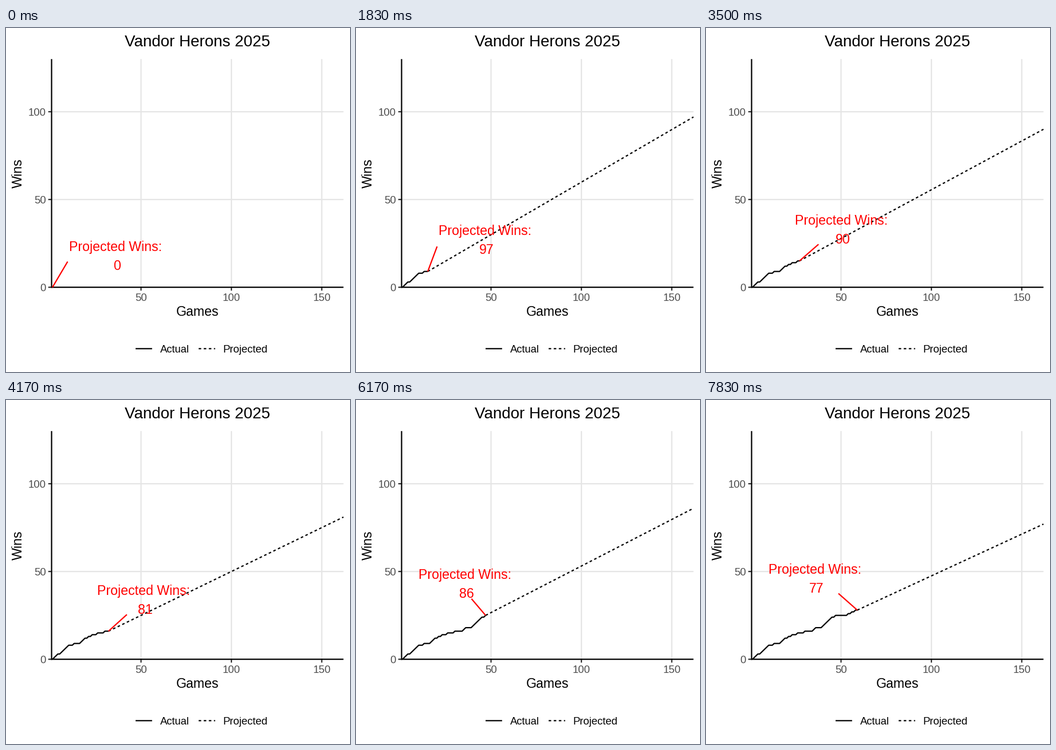
A matplotlib script that plays this animation: 600x600 px, repeating every 8000 ms.

```python
import math

import matplotlib.pyplot as plt
import numpy as np
from matplotlib.animation import FuncAnimation

SIZE, DPI = 600, 100
STEPS, LOOP_MS, TICK_MS = 48, 8000, 25
TICKS = LOOP_MS // TICK_MS
PT = 72 / DPI                       # points per pixel
LINE = 2.22 * PT
LEFT, RIGHT, TOP, BOTTOM = 79.5, 588.6, 54.2, 452.2
SEASON = 162
RESULTS = "LWWWLWWWWWLLWLLLWWWLWLWLLWLLLWLLLLWWLLLWWWWWWLWLLLLLLWLWLWL"
WINS = np.cumsum([r == "W" for r in RESULTS])

plt.rcParams["font.family"] = "Liberation Sans"


def px(game):
    return 235.5 + (game - 50) * 3.1525


def py(wins):
    return BOTTOM - wins * (BOTTOM - TOP) / 130


fig = plt.figure(figsize=(SIZE / DPI, SIZE / DPI), dpi=DPI, facecolor="white")
ax = fig.add_axes([0, 0, 1, 1])
ax.set(xlim=(0, SIZE), ylim=(SIZE, 0))
ax.axis("off")


def line(xs, ys, color="black", z=3, **kw):
    return ax.plot(xs, ys, color=color, lw=LINE, solid_capstyle="butt",
                   dash_capstyle="butt", snap=False, zorder=z, **kw)[0]


def text(x, y, s, size, color="black", ha="center", **kw):
    return ax.text(x, y, s, fontsize=size * PT, color=color, ha=ha,
                   va="baseline", zorder=6, **kw)


def draw_chart():
    for wins in (0, 50, 100):
        y = py(wins)
        if wins:
            line([LEFT, RIGHT], [y, y], "#E5E5E5", 1)
        line([LEFT - 5.8, LEFT], [y, y], "#333333", 2)
        text(69.5, y + 6.6, str(wins), 18.5, "#4D4D4D", "right")
    for game in (50, 100, 150):
        x = px(game)
        line([x, x], [TOP, BOTTOM], "#E5E5E5", 1)
        line([x, x], [BOTTOM, BOTTOM + 5.8], "#333333", 2)
        text(x, 476, str(game), 18.5, "#4D4D4D")
    line([LEFT, LEFT], [TOP, BOTTOM + 1.1])
    line([LEFT, RIGHT], [BOTTOM, BOTTOM])

    text(333.8, 32, "Vandor Herons 2025", 27.7)
    text(334, 502, "Games", 23.1)
    text(28, 253.5, "Wins", 23.1, rotation=90, rotation_mode="anchor")

    line([226, 254.8], [559.3, 559.3])
    line([336, 364.8], [559.3, 559.3], dashes=(2, 2))
    text(269.3, 566, "Actual", 18.4, ha="left")
    text(378.6, 566, "Projected", 18.5, ha="left")


def label_left(game):
    if game > 36:
        return 109.4
    return np.interp(game, [1, 10, 20, 27, 36], [110.3, 139.6, 148.9, 154.7, 162.4])


def connector(x, y, left):
    """Point on the label box where the pointer line ends."""
    x1, mid_x = left - 2.8, left + 83.7
    bottom, mid_y = y - 29, y - 55
    w, h = RIGHT - LEFT, BOTTOM - TOP
    end_x = max(x, x1)
    dist = math.hypot((x - end_x) / w, (y - bottom) / h)
    if x >= x1:
        alt = math.hypot((x - mid_x) / w, (y - bottom) / h)
        return end_x + (mid_x - end_x) * dist / alt, bottom
    alt = math.hypot((x - x1) / w, (y - mid_y) / h)
    return x1, bottom + (mid_y - bottom) * dist / alt


draw_chart()
actual = line([], [])
projected = line([], [], dashes=(2, 2))
pointer = line([], [], "red", 5)
caption = text(0, 0, "Projected Wins:", 23.1, "red", "left")
number = text(0, 0, "", 23.1, "red")


def update(tick):
    # each step starts on the last tick not later than its exact time
    step = (tick * STEPS + STEPS - 1) // TICKS
    game = int(1.5 + step * (len(RESULTS) - 1) / (STEPS - 1))
    wins = WINS[game - 1]
    total = int(wins / game * SEASON + 0.5)
    x, y = px(game), py(wins)
    left = label_left(game)
    end_x, end_y = connector(x, y, left)

    actual.set_data(px(np.arange(1, game + 1)), py(WINS[:game]))
    projected.set_data([x, px(SEASON)], [y, py(total)])
    projected.set_visible(total > 0)
    pointer.set_data([x, end_x], [y, end_y])
    caption.set_position((left, y - 63.7))
    number.set_position((left + 83.7, y - 30.7))
    number.set_text(str(total))
    return actual, projected, pointer, caption, number


anim = FuncAnimation(fig, update, frames=TICKS, interval=TICK_MS,
                     repeat=True, repeat_delay=0, blit=False)
plt.show()
```
